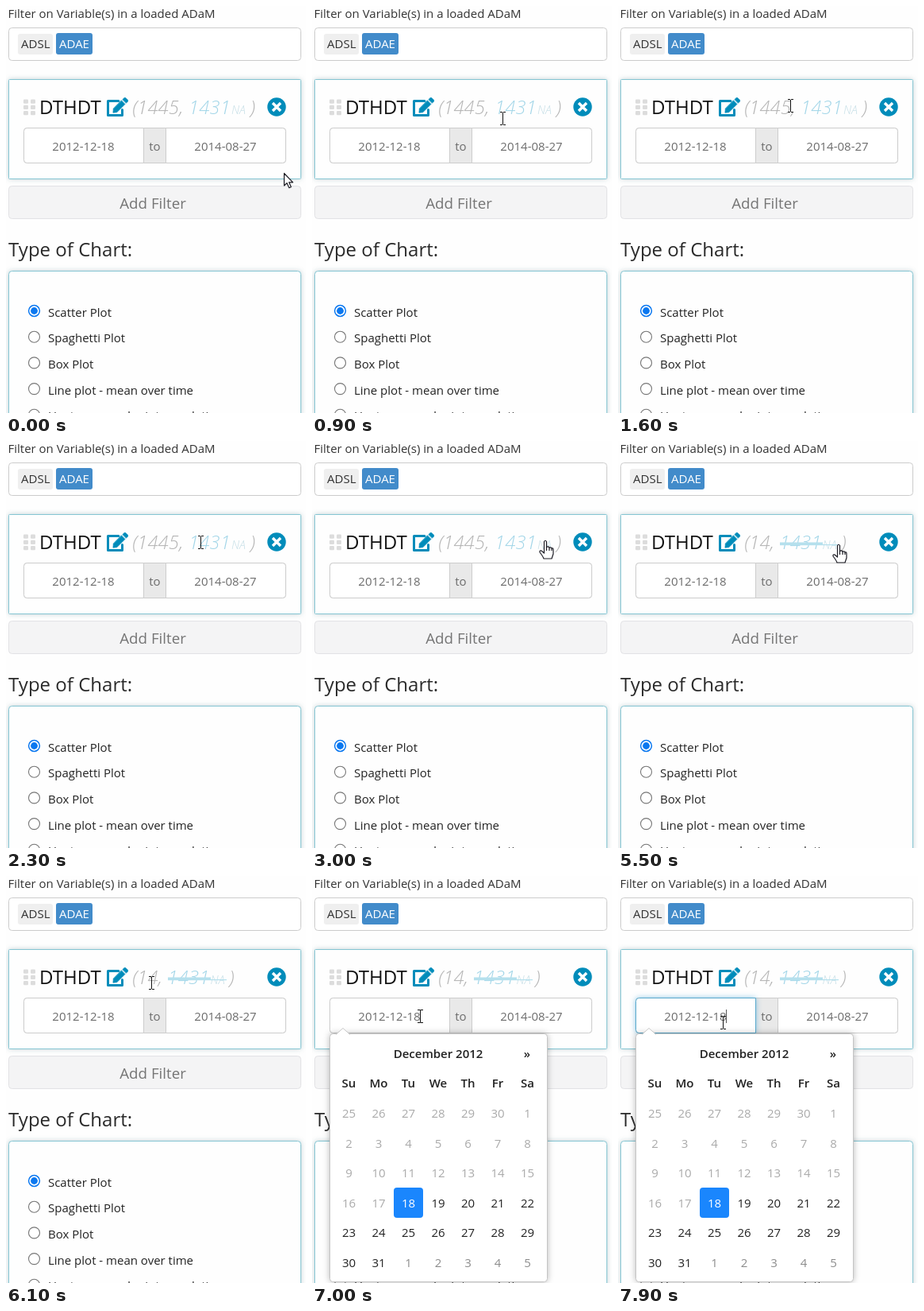
An HTML page with a canvas that plays this animation: 378x512 px, repeating every 8 s.

```html
<!DOCTYPE html>
<html lang="en">
<head>
<meta charset="utf-8">
<title>Date filter</title>
<style>
  html, body { margin: 0; width: 100%; height: 100%; overflow: hidden; background: #fefefe; }
  canvas { display: block; width: 378px; height: 512px; }
</style>
</head>
<body>
<canvas id="stage" width="378" height="512"></canvas>
<script>
const ctx = document.getElementById('stage').getContext('2d');
const LOOP = 8000, STEP = 100;
const FAMILY = '"Open Sans", "Noto Sans", sans-serif';
const BLUE = '#008cba';

// time, x, y of the pointer's hot spot
const PATH = [
  [0, 350, 210], [400, 304, 186], [900, 240, 141], [1000, 237, 137], [1100, 237, 137],
  [1600, 217, 125], [2000, 224, 127], [2400, 252, 127], [2900, 294, 125], [3000, 294, 125],
  [3300, 294, 129], [5400, 294, 129], [6100, 183, 134], [6300, 166, 143], [6800, 136, 176],
  [7000, 136, 176], [7800, 132, 184], [8000, 132, 184]
];

const clamp01 = v => Math.max(0, Math.min(1, v));
const mix = (a, b, k) => a + (b - a) * k;

function text(str, x, y, { size = 15, style = '', color = '#333', align = 'left' } = {}) {
  ctx.font = `${style} ${size}px ${FAMILY}`;
  ctx.fillStyle = color;
  ctx.textAlign = align;
  ctx.fillText(str, x, y);
}

function box(x, y, w, h, radius, fill, stroke, glow, blur = 5) {
  ctx.save();
  ctx.beginPath();
  ctx.roundRect(x, y, w, h, radius);
  if (glow) { ctx.shadowColor = glow; ctx.shadowBlur = blur; }
  if (fill) { ctx.fillStyle = fill; ctx.fill(); }
  ctx.shadowColor = 'transparent';
  if (stroke) { ctx.strokeStyle = stroke; ctx.lineWidth = 1; ctx.stroke(); }
  ctx.restore();
}

function disc(x, y, r, fill, stroke, width = 1) {
  ctx.beginPath();
  ctx.arc(x, y, r, 0, Math.PI * 2);
  if (fill) { ctx.fillStyle = fill; ctx.fill(); }
  if (stroke) { ctx.strokeStyle = stroke; ctx.lineWidth = width; ctx.stroke(); }
}

function editIcon(x, y) {
  ctx.save();
  ctx.translate(x, y);
  ctx.scale(27 / 576, 27 / 576);
  ctx.strokeStyle = ctx.fillStyle = BLUE;
  ctx.lineJoin = ctx.lineCap = 'round';
  ctx.lineWidth = 64;
  ctx.stroke(new Path2D('M318 96H32V480H416V330'));
  ctx.lineWidth = 14;
  for (const d of ['M396 84L490 180L272 399L168 410L178 304Z',
                   'M425 54L466 14Q488 0 510 14L562 66Q576 88 562 110L522 151Z']) {
    const p = new Path2D(d);
    ctx.fill(p);
    ctx.stroke(p);
  }
  ctx.restore();
}

function closeIcon(x, y) {
  disc(x, y, 11.7, BLUE);
  ctx.strokeStyle = '#fff';
  ctx.lineWidth = 3.4;
  ctx.lineCap = 'butt';
  ctx.beginPath();
  for (const s of [-1, 1]) {
    ctx.moveTo(x - 5, y - 5 * s);
    ctx.lineTo(x + 5, y + 5 * s);
  }
  ctx.stroke();
}

function counts(t) {
  const updated = t >= 4700;
  const shift = updated ? -26.4 : 0;
  const light = { size: 24, style: 'italic 300', color: '#b4b4b4' };
  ctx.save();
  ctx.globalAlpha = updated ? (t < 4800 ? 0.6 : 1) : mix(1, 0.35, clamp01((t - 3800) / 600));
  text(updated ? '(14,' : '(1445,', 159, 136, light);
  text('1431', 230 + shift, 136, { ...light, color: '#a3d6e8' });
  text('NA', 284 + shift, 136, { ...light, size: 15, color: '#c3dde5' });
  text(')', 308 + shift, 136, light);
  if (updated) {
    ctx.fillStyle = '#b5e0ed';
    ctx.fillRect(204, 127.5, 54, 2.5);
    ctx.fillRect(204, 130, 74, 1.2);
  }
  ctx.restore();
}

function filterCard(t) {
  box(3.5, 92.5, 368, 125, 1, '#fefefe', '#85c5d2', 'rgba(60,110,120,.35)', 6);
  for (let i = 0; i < 6; i++)
    box(22 + (i % 2) * 9, 117.5 + (i >> 1) * 7.3, 6, 5.2, 1.3, '#dcdcdc');
  text('DTHDT', 42, 136, { size: 24, color: '#111' });
  editIcon(127, 115);
  counts(t);
  closeIcon(341, 127);

  const gray = { color: '#6c6c6c', align: 'center' };
  ctx.fillStyle = '#e9e9e9';
  ctx.fillRect(174, 154, 28, 43);
  box(22.5, 153.5, 330, 44, 4, null, '#ccc');
  box(201.5, 153.5, 151, 44, [0, 4, 4, 0], '#fff', '#ccc');
  const focus = clamp01((t - 7000) / 200);
  box(22.5, 153.5, 151, 44, [4, 0, 0, 4], '#fff', '#ccc');
  if (focus) {
    ctx.save();
    ctx.globalAlpha = focus;
    box(22.5, 153.5, 151, 44, [4, 0, 0, 4], '#fff', '#5aa9cc', 'rgba(70,165,215,.7)', 7);
    ctx.restore();
  }
  text('2012-12-18', 97.5, 182, gray);
  text('to', 187.5, 182, gray);
  text('2014-08-27', 276.5, 182, gray);
  if (t >= 7000 && Math.floor((t - 6900) / 500) % 2 === 0) {
    ctx.fillStyle = '#555';
    ctx.fillRect(136, 168, 1, 17);
  }
}

function chartTypes() {
  text('Type of Chart:', 3, 315, { size: 24, color: '#2a2a2a' });
  box(3.5, 333.5, 368, 220, 4, '#fefefe', '#85c5d2', 'rgba(60,110,120,.35)', 6);
  ['Scatter Plot', 'Spaghetti Plot', 'Box Plot', 'Line plot - mean over time',
   'Heatmap - endpoint correlations'].forEach((label, i) => {
    const y = 383.5 + i * 32.7;
    if (i) {
      disc(35.5, y, 7, '#fff', '#767676', 1.1);
    } else {
      disc(35.5, y, 6.9, '#fff', '#0b78f0', 1.5);
      disc(35.5, y, 4.4, '#0b78f0');
    }
    text(label, 53, Math.round(390.6 + i * 32.7), { color: '#222' });
  });
}

function calendar() {
  box(22.5, 198.5, 274, 312, 4, '#fff', '#c4c4c4', 'rgba(0,0,0,.3)', 8);
  ctx.beginPath();
  ctx.moveTo(30, 199.5);
  ctx.lineTo(39, 191.5);
  ctx.lineTo(48, 199.5);
  ctx.fillStyle = '#fff';
  ctx.fill();
  ctx.strokeStyle = '#c8c8c8';
  ctx.lineWidth = 1;
  ctx.stroke();

  const bold = { style: '600', color: '#222', align: 'center' };
  text('December 2012', 159, 229, bold);
  text('»', 271, 229, bold);
  const column = i => 46.5 + (i % 7) * 37.5;
  ['Su', 'Mo', 'Tu', 'We', 'Th', 'Fr', 'Sa'].forEach((d, i) => text(d, column(i), 266, bold));

  const first = 23;
  for (let i = 0; i < 42; i++) {
    const day = i - 5, x = column(i), y = 304 + Math.floor(i / 7) * 37.5;
    if (i === first) box(103, 392, 37, 38, 4, '#1a86fd');
    const label = day < 1 ? day + 30 : day > 31 ? day - 31 : day;
    const color = i < first ? '#aaa' : i === first ? '#fff' : day > 31 ? '#8c8c8c' : '#222';
    text(label, x, Math.round(y), { color, align: 'center' });
  }
}

function pointerAt(t) {
  const i = Math.max(1, PATH.findIndex(p => p[0] > t));
  const [t0, x0, y0] = PATH[i - 1], [t1, x1, y1] = PATH[i];
  const k = clamp01((t - t0) / (t1 - t0));
  return [Math.round(mix(x0, x1, k)), Math.round(mix(y0, y1, k))];
}

function pointerKind(x, y, t) {
  const na = t < 5500 ? 283 : 258;
  if (y > 110 && y < 147 && x > 158 && x < 318)
    return x > na && x < na + 22 ? 'hand' : 'beam';
  if (y > 153 && y < 198 && (x < 174 || x > 201) && x < 353) return 'beam';
  return 'arrow';
}

const SHAPES = {
  arrow: 'M.5 .5V16L4 12.7L6.7 18.7L9.2 17.6L6.6 11.8H11.5Z',
  hand: 'M-1.5 1.5Q0 -1 1.5 1.5V8.5Q4 7 5 9.3Q7 8 8 10Q10 9 10 12V17Q9 20 8 23H-2Q-3 20 -7 15Q-7.5 12.5 -5 13L-1.5 16Z'
};

function pointer(t) {
  const [x, y] = pointerAt(t);
  const kind = pointerKind(x, y, t);
  ctx.save();
  ctx.translate(x, y);
  if (kind === 'beam') {
    ctx.fillStyle = '#111';
    ctx.fillRect(0, -7, 1, 15);
    for (const sy of [-8, 8]) {
      ctx.fillRect(-3, sy, 3, 1);
      ctx.fillRect(1, sy, 3, 1);
    }
  } else {
    const shape = new Path2D(SHAPES[kind]);
    ctx.fillStyle = '#fff';
    ctx.strokeStyle = '#1c1c24';
    ctx.lineWidth = 1.2;
    ctx.lineJoin = 'round';
    ctx.fill(shape);
    ctx.stroke(shape);
    if (kind === 'hand') ctx.stroke(new Path2D('M1.5 8V13M5 9V13M8 10V13'));
  }
  ctx.restore();
}

function draw(t) {
  ctx.fillStyle = '#fefefe';
  ctx.fillRect(0, 0, 378, 512);
  text('Filter on Variable(s) in a loaded ADaM', 2.5, 15);
  box(3.5, 27.5, 368, 41, 4, '#fff', '#ccc');
  box(15, 35, 44, 26, 3, '#efefef');
  text('ADSL', 19, 53);
  box(63, 34, 46, 27, 3, '#428bca');
  text('ADAE', 67, 53, { color: '#fff' });
  filterCard(t);
  box(3.5, 226.5, 368, 41, 4, '#f4f4f5', '#e2e2e5');
  text('Add Filter', 185, 255, { size: 18.75, color: '#757575', align: 'center' });
  chartTypes();
  if (t >= 7000) calendar();
  pointer(t);
}

const start = performance.now();
function frame() {
  const t = (performance.now() - start) % LOOP;
  draw(Math.floor(t / STEP) * STEP);
  requestAnimationFrame(frame);
}
frame();
</script>
</body>
</html>
```
